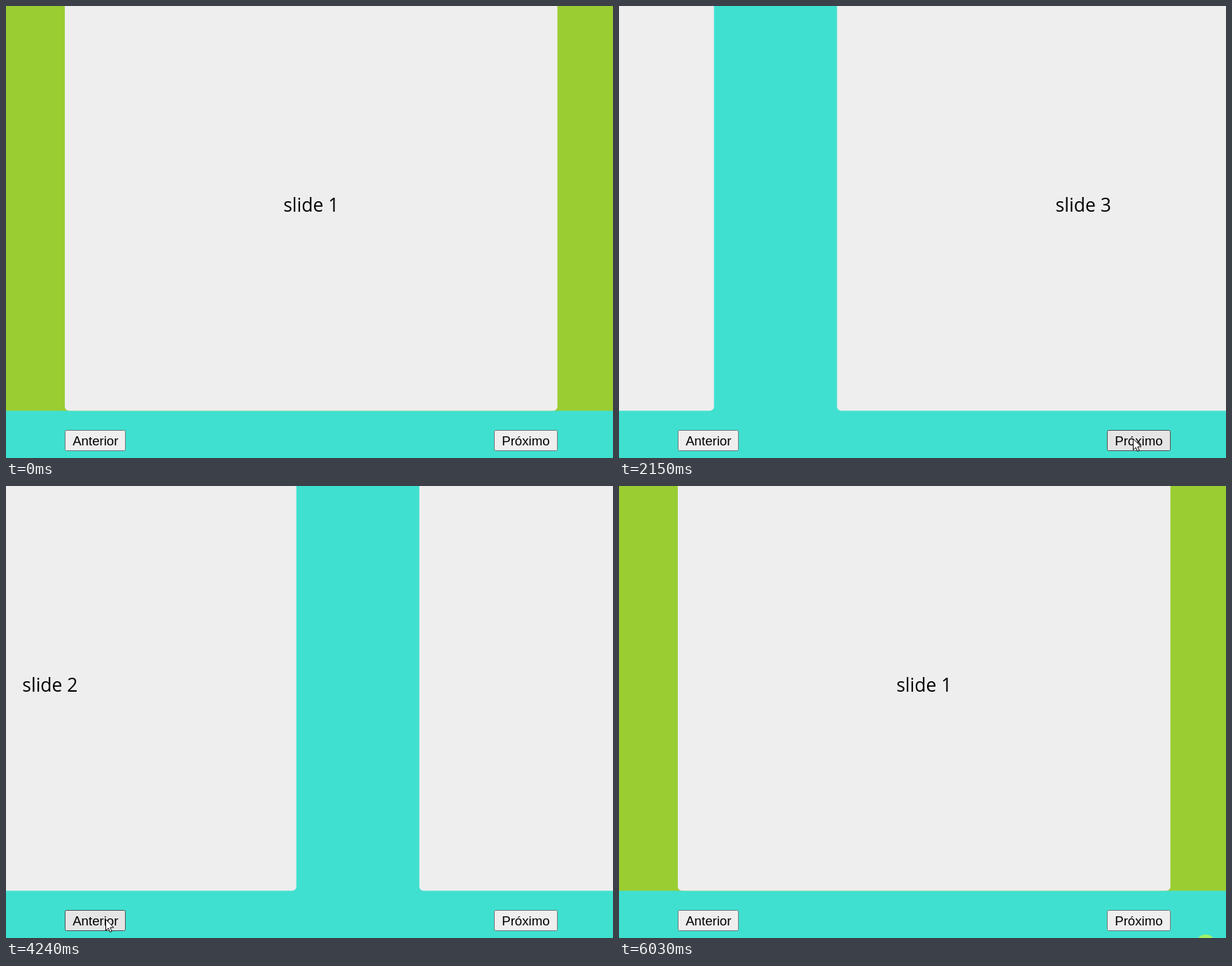
Animation, 867 px wide and 646 px high, one loop 6.11 s. Source, as an HTML page:

```html
<!DOCTYPE html>
<html lang="pt">
<head>
<meta charset="utf-8">
<title>Slides</title>
<style>
  html, body { margin: 0; width: 100%; height: 100%; overflow: hidden; background: #40e0d0; }
  svg { display: block; width: 867px; height: 646px; }
  text { text-anchor: middle; }
  .slide { fill: #eee; }
  .title { font: 26.5px "Open Sans", "Noto Sans", sans-serif; }
  .button rect { fill: #efefef; stroke: #767676; }
  .button text { font: 18.67px "Liberation Sans", Arial, sans-serif; }
  .button.hover rect { fill: #e5e5e5; stroke: #4f4f4f; }
  .button.active rect { fill: #f5f5f5; stroke: #8d8d8d; }
</style>
</head>
<body>
<svg viewBox="0 0 867 646">
  <g id="track">
    <rect x="-3.8" y="-10" width="879.3" height="588.5" fill="#9acd32"/>
  </g>
  <g class="button" data-left="84" data-right="171">
    <rect x="84.5" y="606.5" width="86" height="29" rx="2"/>
    <text x="127.8" y="628">Anterior</text>
  </g>
  <g class="button" data-left="697" data-right="788">
    <rect x="697.5" y="606.5" width="90" height="29" rx="2"/>
    <text x="742.4" y="628">Próximo</text>
  </g>
  <g id="cursor">
    <circle id="glow" r="14" fill="#ff0" fill-opacity=".5"/>
    <path d="M.5 .5V16.5L4.2 13L6.7 18.5L9.2 17.4L6.8 12H11.8Z" fill="#fff" stroke="#000"/>
  </g>
</svg>
<script>
const LOOP = 6110, PITCH = 879.3, SCROLL_MS = 300, STEP = 77, HOLD = 120;

// Key points of the pointer: [time, x, y]
const path = [
  [0, 692, 700], [200, 692, 640], [430, 692, 430], [810, 760, 470],
  [1130, 734, 618], [2650, 734, 618], [2940, 559, 618], [3200, 755, 614],
  [3500, 755, 617], [3780, 450, 591], [4060, 142, 619], [5260, 142, 619],
  [5480, 520, 660], [6000, 838, 655], [LOOP, 838, 655]
];

const presses = [1240, 1920, 3250, 4050, 4480, 4980, 6030];

// The slides move in visible steps; "done" is the time already eased at "at"
const scrolls = [
  { at: 1360, done: 16.6, dir: 1 },
  { at: 2150, done: 133.4, dir: 1 },
  { at: 4240, done: 100, dir: -1 },
  { at: 4620, done: 16.8, dir: -1 }
];

const svg = document.querySelector("svg");
const track = document.getElementById("track");
const cursor = document.getElementById("cursor");
const glow = document.getElementById("glow");
const buttons = [...document.querySelectorAll(".button")];

function add(tag, attrs, text = "") {
  const el = document.createElementNS(svg.namespaceURI, tag);
  for (const key in attrs) el.setAttribute(key, attrs[key]);
  el.textContent = text;
  track.append(el);
}

for (let i = 0; i < 3; i++) {
  const x = 84 + i * PITCH;
  add("rect", { class: "slide", x, y: -10, width: 703.6, height: 588.5, rx: 6 });
  add("text", { class: "title", x: x + 351.8, y: 294 }, `slide ${i + 1}`);
}

// CSS "ease": cubic-bezier(.25, .1, .25, 1)
function ease(p) {
  if (p <= 0 || p >= 1) return p <= 0 ? 0 : 1;
  let lo = 0, hi = 1;
  for (let i = 0; i < 24; i++) {
    const s = (lo + hi) / 2;
    if (0.75 * s * (1 - s) + s ** 3 < p) lo = s; else hi = s;
  }
  return 0.3 * lo * (1 - lo) ** 2 + 3 * lo * lo * (1 - lo) + lo ** 3;
}

function slideAt(t) {
  return scrolls.reduce((sum, { at, done, dir }) => {
    const elapsed = done + Math.floor((t - at) / STEP) * STEP;
    return sum + dir * ease(elapsed / SCROLL_MS);
  }, 0);
}

function pointerAt(t) {
  const i = Math.max(1, path.findIndex(k => k[0] >= t));
  const [t0, x0, y0] = path[i - 1], [t1, x1, y1] = path[i];
  const p = (t - t0) / (t1 - t0);
  return [x0 + (x1 - x0) * p, y0 + (y1 - y0) * p].map(Math.round);
}

function draw(t) {
  track.setAttribute("transform", `translate(${-Math.round(slideAt(t) * PITCH * 10) / 10} 0)`);

  const [x, y] = pointerAt(t);
  const pressed = presses.some(start => t >= start && t < start + HOLD);
  cursor.setAttribute("transform", `translate(${x} ${y})`);
  glow.style.display = pressed ? "" : "none";

  for (const b of buttons) {
    const over = x >= b.dataset.left && x < b.dataset.right && y >= 606 && y < 636;
    b.classList.toggle("hover", over);
    b.classList.toggle("active", over && pressed);
  }
}

const begin = performance.now();
function tick() {
  draw((performance.now() - begin) % LOOP);
  requestAnimationFrame(tick);
}
tick();
</script>
</body>
</html>
```
